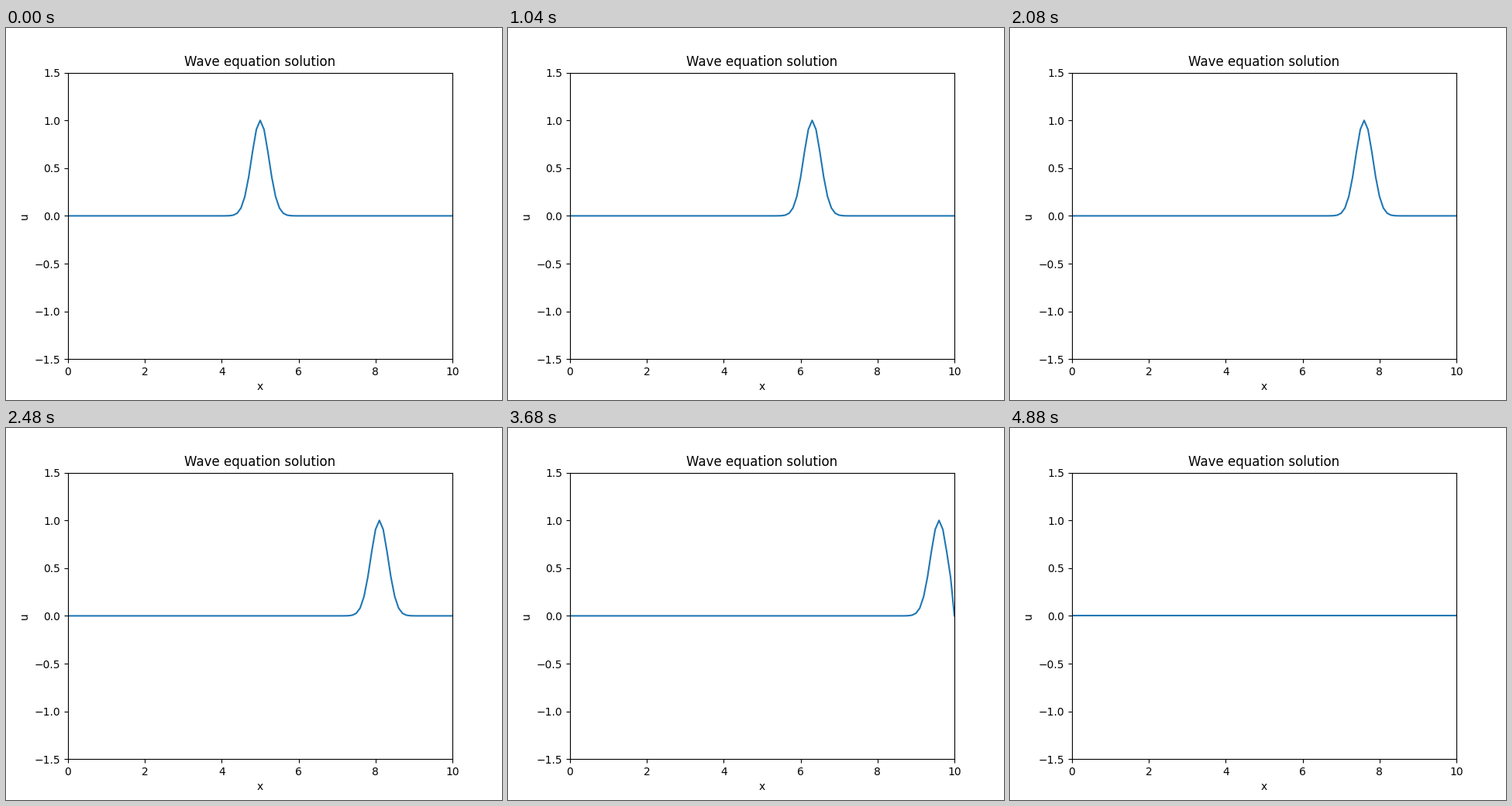
A matplotlib script for the animation above (8200 ms loop, 640 by 480 pixels).

```python
import numpy as np
import matplotlib.pyplot as plt
from matplotlib.animation import FuncAnimation

TICK_MS = 40        # timer tick; the wave advances every second one
FRAMES = 205
DX = 0.1            # grid spacing, also the distance moved per step

x = np.linspace(0, 10, 101)


def wave(step):
    """Gaussian pulse travelling right, one grid cell per step."""
    u = np.exp(-10 * (x - 5 - DX * step) ** 2)
    u[0] = u[-1] = 0    # fixed ends
    return u


fig, ax = plt.subplots(figsize=(6.4, 4.8), dpi=100)
line, = ax.plot(x, wave(0))
ax.set(xlim=(0, 10), ylim=(-1.5, 1.5), xlabel="x", ylabel="u",
       title="Wave equation solution")


def update(frame):
    line.set_ydata(wave(frame // 2))
    return line,


anim = FuncAnimation(fig, update, frames=FRAMES, interval=TICK_MS,
                     repeat=True, repeat_delay=0, blit=False)
plt.show()
```
